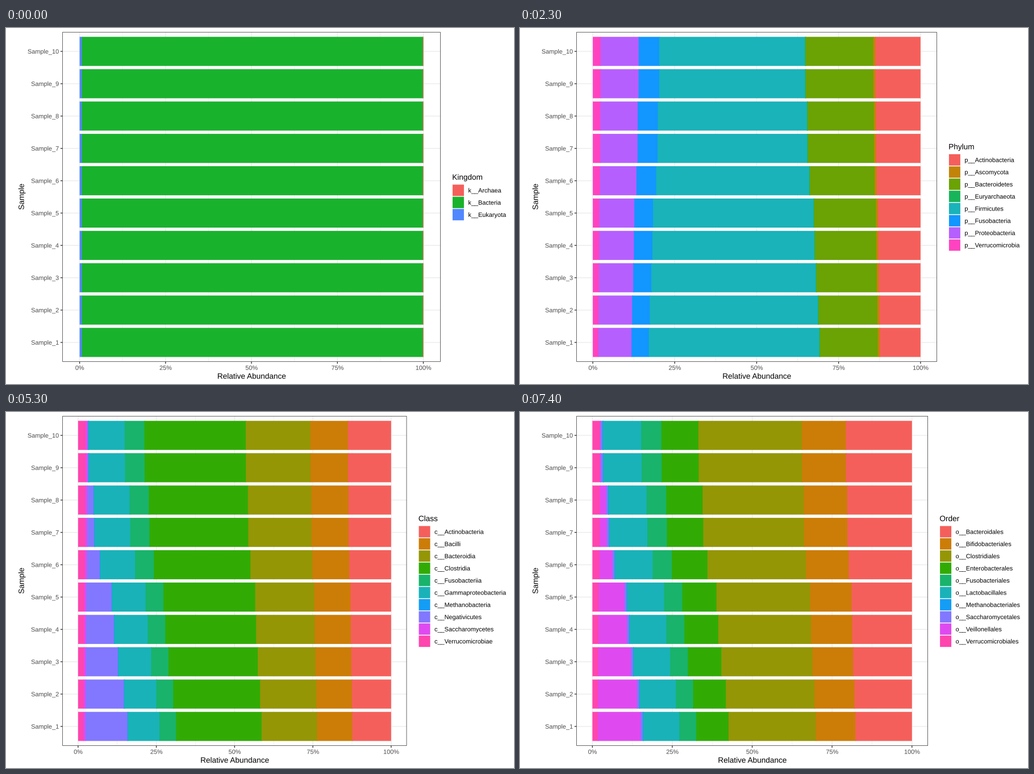
A matplotlib script that plays this animation: 894x626 px, repeating every 8000 ms.

```python
import matplotlib.pyplot as plt
import numpy as np
from matplotlib.animation import FuncAnimation
from matplotlib.patches import PathPatch, Rectangle
from matplotlib.textpath import TextPath
from matplotlib.transforms import Affine2D

plt.rcParams["font.family"] = "Liberation Sans"

W, H, DPI = 894, 626, 72  # at 72 dpi one point is one pixel
LEFT, TOP, BOTTOM = 99.3, 7.0, 587.0
STEP = (BOTTOM - TOP) / 10.2
SMALL, LARGE = 10.9, 13.6
LINE = 1.32
KEY_STEP, KEY_SIZE = 21.4, 20

HUES = {
    3: "#F55F5B #19B22D #5187FF",
    8: "#F55F5B #C28408 #6BA204 #18B45A #19B3B9 #1296FF #B65FFF #FF43C0",
    10: "#F55F5B #CC7D07 #949606 #31AB04 #19B36B #19B2B8 #149DF5 #8278FF "
        "#DF4AF0 #FF45AE",
}

# Kingdom, phylum, class, order, then percent in the first and last sample.
TAXA = [line.split() for line in """
Bacteria Bacteroidetes Bacteroidia Bacteroidales 17.7 20.7
Bacteria Actinobacteria Actinobacteria Bifidobacteriales 12.4 13.8
Bacteria Firmicutes Clostridia Clostridiales 27.3 32.4
Bacteria Proteobacteria Gammaproteobacteria Enterobacterales 10.1 11.6
Bacteria Fusobacteria Fusobacteriia Fusobacteriales 5.3 6.3
Bacteria Firmicutes Bacilli Lactobacillales 11.3 12.0
Archaea Euryarchaeota Methanobacteria Methanobacteriales 0.15 0.15
Eukaryota Ascomycota Saccharomycetes Saccharomycetales 0.65 0.65
Bacteria Firmicutes Negativicutes Veillonellales 13.4 0.1
Bacteria Verrucomicrobia Verrucomicrobiae Verrucomicrobiales 1.7 2.4
""".strip().splitlines()]

# How far each sample has moved from the first community to the last.
MIX = [0, 0.09, 0.24, 0.34, 0.40, 0.70, 0.84, 0.86, 0.99, 1]

# Rank, its start time in ms and the left edge of its legend.
RANKS = [("Kingdom", 0, 785.2), ("Phylum", 500, 754.2),
         ("Class", 3500, 725.8), ("Order", 6500, 738.4)]
TICK_MS = 500
LOOP_MS = 8000

fig = plt.figure(figsize=(W / DPI, H / DPI), dpi=DPI, facecolor="white")
ax = fig.add_axes([0, 0, 1, 1])


def rect(x0, y0, x1, y1, color):
    ax.add_patch(Rectangle((x0, y0), x1 - x0, y1 - y0, facecolor=color,
                           linewidth=0, snap=False, zorder=2))


def line(x0, y0, x1, y1, color, width=LINE):
    ax.plot([x0, x1], [y0, y1], color=color, linewidth=width, snap=False,
            solid_capstyle="butt", zorder=1)


def label(x, y, text, size=SMALL, color="black", align=0, angle=0):
    """Outline text on a baseline; align 0, 0.5 or 1 is left, centre, right."""
    path = TextPath((0, 0), text, size=size)
    shift = align * path.get_extents().x1 if align else 0
    place = Affine2D().translate(-shift, 0).scale(1, -1)
    place.rotate_deg(-angle).translate(x, y)
    ax.add_patch(PathPatch(place.transform_path(path), facecolor=color,
                           linewidth=0, snap=False, zorder=4))


def row_y(sample):
    return BOTTOM - (0.6 + sample) * STEP


def draw_axes(right, zero, full):
    for k in range(9):
        x = zero + (full - zero) * k / 8
        line(x, TOP, x, BOTTOM, "#EBEBEB", LINE / 2 if k % 2 else LINE)
        if k % 2 == 0:
            line(x, BOTTOM, x, BOTTOM + 3.4, "#333333")
            label(x, 601.2, f"{k * 25 // 2}%", color="#4D4D4D", align=0.5)
    for sample in range(len(MIX)):
        y = row_y(sample)
        line(LEFT, y, right, y, "#EBEBEB")
        line(LEFT - 3.4, y, LEFT, y, "#333333")
        label(92.7, y + 3.9, f"Sample_{sample + 1}", color="#4D4D4D", align=1)
    ax.add_patch(Rectangle((LEFT + 0.33, TOP + 0.33), right - LEFT - 0.66,
                           BOTTOM - TOP - 0.66, fill=False, linewidth=0.75,
                           edgecolor="#333333", snap=False, zorder=3))
    label((LEFT + right) / 2, 616.7, "Relative Abundance", LARGE, align=0.5)
    label(31.6, (TOP + BOTTOM) / 2, "Sample", LARGE, align=0.5, angle=90)


def shares(rank, names, mix):
    """Fraction of each name at one rank, summed over its members."""
    total = dict.fromkeys(names, 0)
    for taxon in TAXA:
        first, last = map(float, taxon[4:])
        total[taxon[rank]] += first + (last - first) * mix
    values = np.array(list(total.values()))
    return values / values.sum()


def draw_bars(rank, names, colors, zero, full):
    for sample, mix in enumerate(MIX):
        y = row_y(sample)
        parts = shares(rank, names, mix)[::-1]
        cuts = zero + (full - zero) * np.append(0, np.cumsum(parts))
        for x0, x1, color in zip(cuts, cuts[1:], reversed(colors)):
            # a small overlap hides the seam under the next segment
            rect(x0, y - 0.45 * STEP, min(x1 + 1, full), y + 0.45 * STEP, color)


def draw_legend(x, title, names, colors):
    first = 306.8 - (len(names) - 1) / 2 * KEY_STEP
    label(x, first - 18.6, title, LARGE)
    cx, half = x + KEY_STEP / 2, KEY_SIZE / 2
    for i, (name, color) in enumerate(zip(names, colors)):
        y = first + i * KEY_STEP
        rect(cx - half, y - half, cx + half, y + half, color)
        label(x + 28.2, y + 3.9, f"{title[0].lower()}__{name}")


def draw(frame):
    now = frame * TICK_MS
    rank = sum(now >= start for _, start, _ in RANKS) - 1
    title, _, legend_x = RANKS[rank]
    names = sorted({taxon[rank] for taxon in TAXA})
    colors = HUES[len(names)].split()
    right = legend_x - 20.5
    pad = (right - LEFT) / 22
    zero, full = LEFT + pad, right - pad

    ax.clear()
    ax.set_xlim(0, W)
    ax.set_ylim(H, 0)
    ax.axis("off")
    draw_axes(right, zero, full)
    draw_bars(rank, names, colors, zero, full)
    draw_legend(legend_x, title, names, colors)
    return []


anim = FuncAnimation(fig, draw, frames=LOOP_MS // TICK_MS, interval=TICK_MS,
                     repeat=True, repeat_delay=0, blit=False)
plt.show()
```
